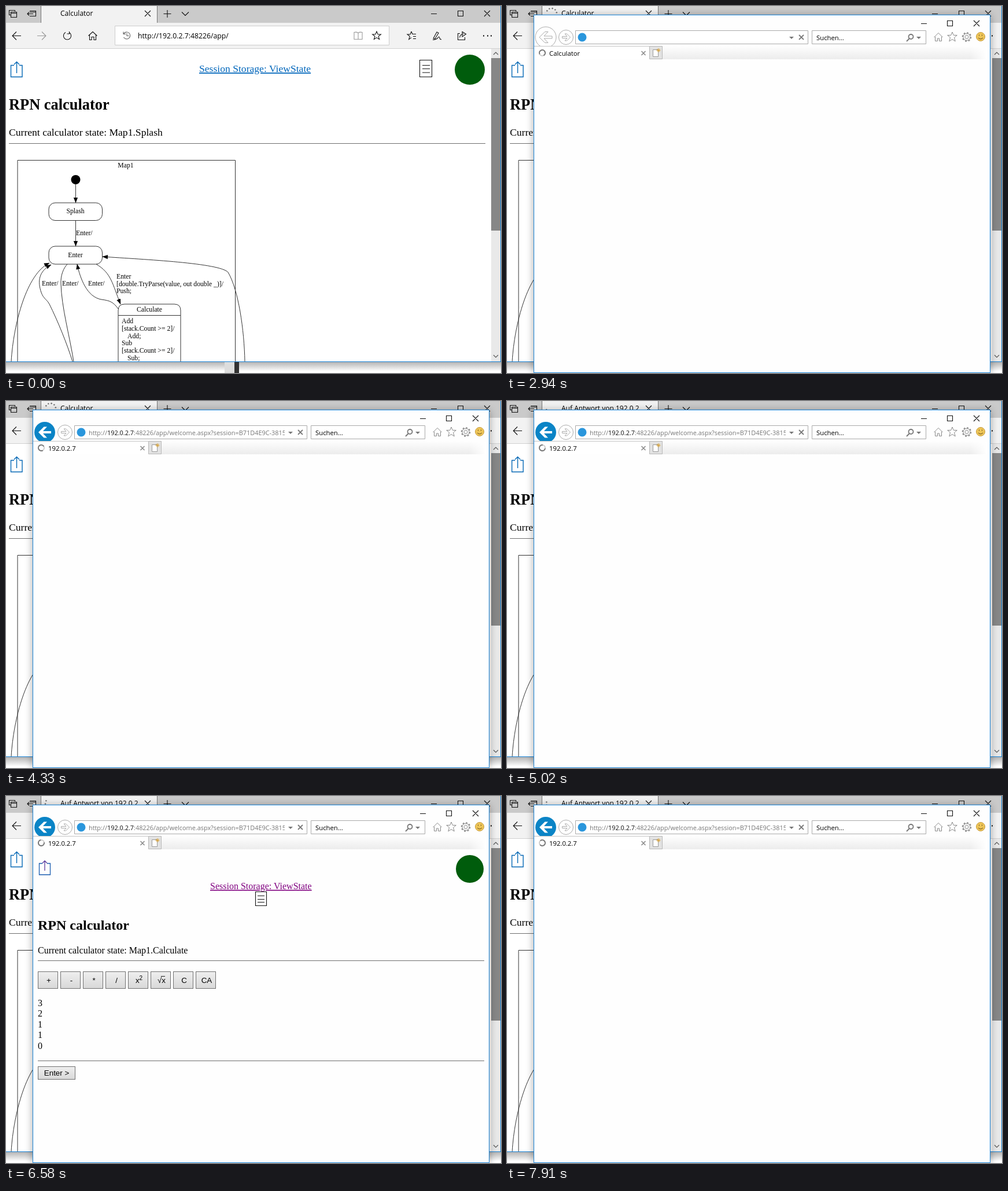
Recreate the animation shown at these times as an HTML page. Size 856 px wide and 634 px high, loop 8 s.

```html
<!DOCTYPE html>
<html lang="en">
<head>
<meta charset="utf-8">
<title>Calculator</title>
<style>
html, body { margin: 0; width: 100%; height: 100%; overflow: hidden; background: #fff }
svg { display: block }
text { font: 12px "Open Sans", "Noto Sans", sans-serif; white-space: pre }
.serif text { font-family: "Liberation Serif", serif; font-size: 16px }
.big text { font-size: 17.6px }
.serif text.h2 { font-weight: bold; font-size: 24px }
.big text.h2 { font-size: 26.4px }
.map text { font-size: 11.7px }
.serif text.ui { font: 13.33px "Liberation Sans", sans-serif }
#front > text { font-size: 11.3px }
#url { font-size: 10.9px }
.line { fill: none; stroke: #111; stroke-width: 1.1 }
.grey { stroke: #999 }
.map .line { stroke: #333; stroke-width: 1 }
.mid { text-anchor: middle }
.rule { stroke: #6e6e6e }
#frame { filter: drop-shadow(0 2px 7px rgba(0, 0, 0, .35)) }
</style>
</head>
<body>
<svg width="856" height="634" viewBox="0 0 856 634">
<defs>
  <marker id="tip" markerUnits="userSpaceOnUse" markerWidth="10" markerHeight="8" refX="9" refY="4" orient="auto"><path d="M0 .4L9.5 4L0 7.6z"/></marker>
  <linearGradient id="shade" x2="0" y2="1"><stop stop-color="#b4b4b4"/><stop offset="1" stop-color="#fff"/></linearGradient>
  <linearGradient id="strip" x2="0" y2="1"><stop stop-color="#fdfdfd"/><stop offset="1" stop-color="#ececec"/></linearGradient>
  <linearGradient id="fade"><stop stop-color="#fff" stop-opacity="0"/><stop offset="1" stop-color="#fff"/></linearGradient>
  <linearGradient id="btn" x2="0" y2="1"><stop stop-color="#efefef"/><stop offset="1" stop-color="#d8d8d8"/></linearGradient>
  <clipPath id="view"><path d="M0 74H838V614H0z"/></clipPath>
  <clipPath id="tabClip"><path d="M62 0H229V29H62z"/></clipPath>
  <clipPath id="urlClip"><path d="M140 43H482V66H140z"/></clipPath>
</defs>

<!-- back window: chrome -->
<path fill="#fff" d="M0 0H856V634H0z"/>
<path fill="url(#shade)" d="M0 615H856V631H0z"/>
<path fill="#ddd" d="M378 615h17v19h-17z"/>
<path fill="#333" d="M395 615h8v19h-8z"/>
<path fill="#cacaca" d="M0 0H856V29H0z"/>
<path fill="#f2f2f2" d="M61 0H262V29H856V73H0V29H61z"/>
<path stroke="#777" d="M60.500 0V29M261.500 0V29"/>
<path stroke="#d0d0d0" d="M0 73.500H856"/>
<g clip-path="url(#tabClip)"><text id="tabName" x="94" y="17">Calculator</text></g>
<g id="dots" fill="#777"></g>
<path class="line" d="M8.500 15.500h-3v-8h10v2M8.500 10.500h10v9h-10zM8.500 12.500h10M41 8.500h10.500v9H41M41 10.500h10M37 13.500h10M40 10.500l-3 3l3 3"/>
<path class="line" d="M240 8l10 10m0-10l-10 10M272.500 13.500h13M279 7v13M304 10.500l6 6l6-6M735 13.500h10M781.500 8.500h9v9h-9zM827 8l10 10m0-10l-10 10"/>
<path class="line" d="M26 51.500H11M18 44.500l-7 7l7 7M103 45.500a6.600 6.600 0 1 0 6 0M109.500 44v4h-4M142.500 51.500l7.500-7l7.500 7M144.500 50v8.500h3.500v-5h4v5h3.500V50"/>
<path class="line grey" d="M54 51.500h15M62 44.500l7 7l-7 7"/>
<path fill="#fff" stroke="#ccc" d="M188.500 34.500h474v33h-474z"/>
<path class="line" style="stroke:#666" d="M203.500 48a6 6 0 1 1 0 6M203 44.500v4h4M209 47v4.500h3.500"/>
<path class="line grey" d="M609 46v12M609 46.500q-3-2-7-1v12h14v-12q-4-1-7 1"/>
<path class="line" d="M641 44l2.100 5h5.200l-4.200 3.400l1.500 5.200l-4.600-3l-4.600 3l1.500-5.200l-4.200-3.400h5.200z"/>
<path class="line" d="M701 44l-2 5h-5l4.200 3.400l-1.500 5.200l4.300-3M701 44l2 5M703 48.500h6M704 52.500h5M704 56.500h5M738 58.500q8-1 9-4q2-3 3 1q1 3 3 2M739 56l6-11l3 1.500l-6 10z"/>
<path class="line" d="M785 47.500h-3.500v11h12V54M784.500 54.500q1-6 7-6.500M789 44.500l6.500 4l-6.500 4.500z"/>
<path d="M825 50.500h2v2h-2zM832 50.500h2v2h-2zM838 50.500h2v2h-2z"/>
<text x="228" y="56" style="font-size:12.250px">http://192.0.2.7:48226/app/</text>
<path fill="#e9e9e9" d="M839 74H856V614H839z"/>
<path fill="#878787" d="M839 90H855V388H839z"/>
<path class="line" style="stroke:#555" d="M843 84l4-4l4 4M843 603l4 4l4-4"/>

<!-- back window: page -->
<g clip-path="url(#view)">
  <g class="serif big">
    <path class="line" style="stroke:#0066b4;stroke-width:1.400" d="M14 102.500H8.500v20h19.500v-20h-5M18.500 116V97M14 101l4.500-4.500L23 101"/>
    <text x="334" y="114" fill="#06b" text-decoration="underline">Session Storage: ViewState</text>
    <path class="line" d="M715.500 93.500h21v29h-21zM720 102.500h13M720 108.500h13M720 115h13"/>
    <circle cx="802" cy="110" r="26" fill="#005c0c"/>
    <text class="h2" x="5" y="179">RPN calculator</text>
    <text x="5" y="224">Current calculator state: Map1.Splash</text>
    <path class="rule" d="M5 237.500H829"/>
  </g>
  <g class="serif map">
    <g class="line">
      <path d="M20 640V266.500H396.500V640M194 640V526q0-11 11-11h86q11 0 11 11V640M194 534.500h108"/>
      <rect x="74" y="340" width="92.500" height="30.500" rx="11"/>
      <rect x="74" y="415" width="92.500" height="31" rx="11"/>
      <g marker-end="url(#tip)">
        <path d="M120.500 308V340"/><path d="M120.500 370V415"/>
        <path d="M9 614C13 548 36 462 75 444"/>
        <path d="M115 614C106 585 90 545 75 515C70 506 65 506 61 495C54 475 57 458 78 447"/>
        <path d="M194 523C185 511 180 509 165 507C140 503 128 470 123 446"/>
        <path d="M156 446C182 461 184 480 198 515"/>
        <path d="M413 614C412 560 402 490 384 460C370 444 240 438 167 433"/>
      </g>
      <path d="M117 614C110 570 96 520 95 480C94 465 100 452 106 446"/>
    </g>
    <circle cx="120.500" cy="300" r="8"/>
    <g class="mid">
      <text x="207" y="279">Map1</text><text x="120" y="358">Splash</text>
      <text x="120" y="434">Enter</text><text x="248" y="528">Calculate</text>
    </g>
    <text x="121" y="396">Enter/</text>
    <text x="62" y="483">Enter/</text><text x="97" y="483">Enter/</text><text x="142" y="483">Enter/</text>
    <text x="191" y="471">Enter</text>
    <text x="191" y="483.500">[double.TryParse(value, out double _)]/</text>
    <text x="191" y="496">Push;</text>
    <text x="200" y="548">Add</text><text x="200" y="561">[stack.Count &gt;= 2]/</text><text x="210" y="573.500">Add;</text>
    <text x="200" y="586">Sub</text><text x="200" y="599">[stack.Count &gt;= 2]/</text><text x="210" y="612">Sub;</text>
  </g>
</g>
<path stroke="#1883d7" d="M0 614.500H856M855.500 0V614"/>
<g id="status">
  <path fill="#f2f2f2" stroke="#b8b8b8" d="M-.5 587.500h151v23H-.5z"/>
  <text x="3" y="604" style="font-size:11.400px">http://192.0.2.7:48226/app/</text>
</g>

<!-- front window -->
<g id="front">
  <path id="frame" fill="#fefefe" stroke="#1883d7" d="M46.500 15.500h789v618h-789z"/>
  <path class="line" d="M716 30.500h10M761.500 25.500h9v9h-9zM807 25l10 10m0-10l-10 10"/>
  <path fill="url(#strip)" d="M246 70H830V92H246z"/>
  <path fill="url(#fade)" d="M800 70h30v22h-30z"/>
  <circle id="back" cx="67" cy="54" r="18"/>
  <path id="backArrow" fill="#fff" d="M56 54l9.500-9.500h5.500l-7 7.500h14v4H64l7 7.500h-5.500z"/>
  <g fill="#fff" stroke="#aaa">
    <circle cx="102" cy="54" r="12.500"/>
    <path d="M109.500 54l-6-6h-3.500l4 4.500h-8.500v3h8.500l-4 4.500h3.500z"/>
    <path d="M118.500 42.500h402v23h-402zM527.500 42.500h197v23h-197z"/>
  </g>
  <circle cx="130" cy="54" r="7.500" fill="#2a96dc"/>
  <g clip-path="url(#urlClip)"><text id="url" x="143" y="59" fill="#777">http://<tspan fill="#111">192.0.2.7</tspan>:48226/app/welcome.aspx?session=B71D4E9C-3815</text></g>
  <path fill="#777" d="M488 53h8l-4 4zM708 53h8l-4 4z"/>
  <path fill="none" stroke="#777" stroke-width="1.800" d="M505 50l8 8m0-8l-8 8M696 56l-5 5"/>
  <circle cx="698.500" cy="53" r="4" fill="none" stroke="#777" stroke-width="1.800"/>
  <text x="535" y="59">Suchen...</text>
  <g fill="none" stroke="#8a8a8a">
    <path d="M738.500 54l7.500-7.500l7.500 7.500M740.500 53v7.500h4V56h3v4.500h4V53"/>
    <path d="M770 45l2.300 5.500h6l-4.800 4l1.700 6.500l-5.200-3.500l-5.200 3.500l1.700-6.500l-4.800-4h6z"/>
    <circle cx="795" cy="53.500" r="3"/>
    <circle cx="795" cy="53.500" r="6"/>
    <circle cx="795" cy="53.500" r="7.300" stroke-width="2" stroke-dasharray="2.800 2.930"/>
  </g>
  <circle cx="819" cy="53" r="7.500" fill="#edc558" stroke="#c79a3c"/>
  <path fill="none" stroke="#6b4b16" d="M816.500 49.500v2M821.500 49.500v2M815 55q4 4 8 0"/>
  <path fill="#fff" d="M47 69H246V92H47z"/>
  <path stroke="#c4c4c4" d="M47 69.500H246"/>
  <path fill="#e2e2e2" stroke="#b8b8b8" d="M246.500 69.500h22v22h-22z"/>
  <path fill="#fff" stroke="#999" d="M252.500 75.500h9v12h-9z"/>
  <path stroke="#d9a43a" d="M262 73v7M258.500 76.500h7M259.500 74l5 5m0-5l-5 5"/>
  <path stroke="#8a8a8a" stroke-width="1.600" d="M232.500 78l7 7m0-7l-7 7"/>
  <text id="frontName" x="73" y="86"></text>
  <circle cx="61" cy="81" r="5" fill="none" stroke="#ccc" stroke-width="2"/>
  <path id="ring" fill="none" stroke="#777" stroke-width="2" d="M61 76a5 5 0 1 1-5 5"/>
  <g id="page" class="serif"></g>
</g>

<g id="mouse" fill="#fff" stroke="#000" stroke-linejoin="round">
  <path id="arrow" d="M0 0V17L4 13L7 19L9.500 18L7 12H12z"/>
  <path id="hand" d="M-2 13V1.500Q0-1.500 2 1.500V8Q4 6 5.500 8.500Q7.500 7 8.500 9.500Q11 8 11.500 11V16L9 22H0L-6 13Q-5.500 10-2 13z"/>
</g>
</svg>
<script>
const $ = id => document.getElementById(id);
const LOOP = 8000, OPEN = 2480, LOADED = 3360;
const HOST = '192.0.2.7';
const FIB = [13, 8, 5, 3, 2, 1, 1, 0];

// [start, view, operand or stack depth]
const STEPS = [
  [0, ''], [3560, 'Calculate', 8], [3800, ''], [3940, 'Enter', ''], [4180, 'Calculate', 7], [4290, ''],
  [4560, 'Enter', ''], [4720, 'Enter', '5'], [4870, ''], [5100, 'Calculate', 7], [5320, ''],
  [5560, 'Enter', ''], [5640, 'Enter', '3'], [5840, ''], [5950, 'Calculate', 6], [6150, ''],
  [6400, 'Calculate', 5], [6640, ''], [6800, 'Enter', ''], [7000, ''], [7080, 'Calculate', 4],
  [7300, ''], [7450, 'Enter', '2'], [7540, ''], [7610, 'Calculate', 5], [7800, '']
];

const text = (x, y, s, attrs = '') => `<text x="${x}" y="${y}" ${attrs}>${s}</text>`;
const rule = y => `<path class="rule" d="M55 ${y}H827"/>`;
const button = (x, y, w, h, s) =>
  `<rect x="${x + .5}" y="${y + .5}" width="${w - 1}" height="${h - 1}" fill="url(#btn)" stroke="#707070"/>` +
  text(x + w / 2 + (w < 40 ? 1.5 : 0), y + h / 2 + 4.5, s, 'class="ui mid"');
const footer = y => rule(y + .5) + button(55, y + 10, 65, 23, 'Enter &gt;');

function body(view, value) {
  if (view === 'Enter')
    return '<path fill="#fff" stroke="#707070" d="M55.500 302.500h152v20h-152z"/>' +
      text(58, 317, value, 'class="ui"') + footer(339);
  const sq = 'x<tspan dy="-5" font-size="10">2</tspan>', root = '√x';
  const keys = ['+', '-', '*', '/', sq, root, 'C', 'CA'].map((k, i) => button(55 + 39 * i, 303, 35, 30, k));
  const rows = FIB.slice(8 - value).map((n, i) => text(55, 363 + 18.4 * i, n));
  return keys.join('') + '<path stroke="#222" d="M268 311.500h7"/>' + rows.join('') +
    footer(Math.round(457 + 18.4 * (value - 5)));
}

function page([, view, value]) {
  if (!view) return '';
  return `<path class="line" style="stroke:#1a5cb0;stroke-width:1.300" d="M63 116.500h-5.500v19.500h19v-19.500H71"/>
    <path class="line" style="stroke:#5a3a9c;stroke-width:1.300" d="M67 129V112M63 116l4-4l4 4"/>
    <circle cx="802" cy="126" r="24" fill="#005c0c"/>
    <path class="line" d="M431.500 165.500h19v24h-19zM435 172.500h12M435 178.500h12M435 183.500h12"/>` +
    text(353, 161, 'Session Storage: ViewState', 'fill="#800080" text-decoration="underline"') +
    text(55, 231, 'RPN calculator', 'class="h2"') +
    text(55, 272, 'Current calculator state: Map1.' + view) +
    rule(284.5) + body(view, value);
}

const show = (id, on) => $(id).setAttribute('display', on ? 'inline' : 'none');
const clamp = v => Math.max(0, Math.min(1, v));
const easeOut = v => 1 - (1 - v) ** 2;
$('dots').innerHTML = '<circle r="1.3"/>'.repeat(5);
let shown;

function draw(now) {
  const t = now % LOOP;

  const y = 640 - 430 * clamp((t - 250) / 830) - 107 * easeOut(clamp((t - 1080) / 530));
  const x = 808 - 3 * Math.sin((640 - y) / 537 * Math.PI);
  const over = y < 135;
  $('mouse').setAttribute('transform', `translate(${x.toFixed(1)} ${y.toFixed(1)})`);
  show('mouse', t >= 290 && t < OPEN);
  show('arrow', !over);
  show('hand', over);
  show('status', over && t < OPEN);

  const p = easeOut(clamp((t - OPEN) / 200)), s = .9 + .1 * p;
  show('front', t >= OPEN);
  $('front').setAttribute('opacity', p);
  $('front').setAttribute('transform', `translate(441 324) scale(${s}) translate(-441 -324)`);

  const loaded = t >= LOADED;
  show('url', loaded);
  $('back').setAttribute('fill', loaded ? '#0a84c6' : '#fff');
  $('back').setAttribute('stroke', loaded ? 'none' : '#aaa');
  $('backArrow').setAttribute('stroke', loaded ? 'none' : '#aaa');
  $('frontName').textContent = loaded ? HOST : 'Calculator';
  $('tabName').textContent = t < 5020 ? 'Calculator' : `Auf Antwort von ${HOST} warten`;
  $('ring').setAttribute('transform', `rotate(${t * .45 % 360} 61 81)`);

  show('dots', t >= OPEN);
  [...$('dots').children].forEach((dot, i) => {
    const a = (t - 4330) / 1390 * 2 * Math.PI - .2 - i * .6;
    dot.setAttribute('cx', 77 + 9 * Math.cos(a));
    dot.setAttribute('cy', 13 + 9 * Math.sin(a));
  });

  const step = STEPS.findLast(e => e[0] <= t);
  if (step !== shown) $('page').innerHTML = page(shown = step);
  requestAnimationFrame(() => draw(performance.now() - start));
}
const start = performance.now();
draw(0);
</script>
</body>
</html>
```
